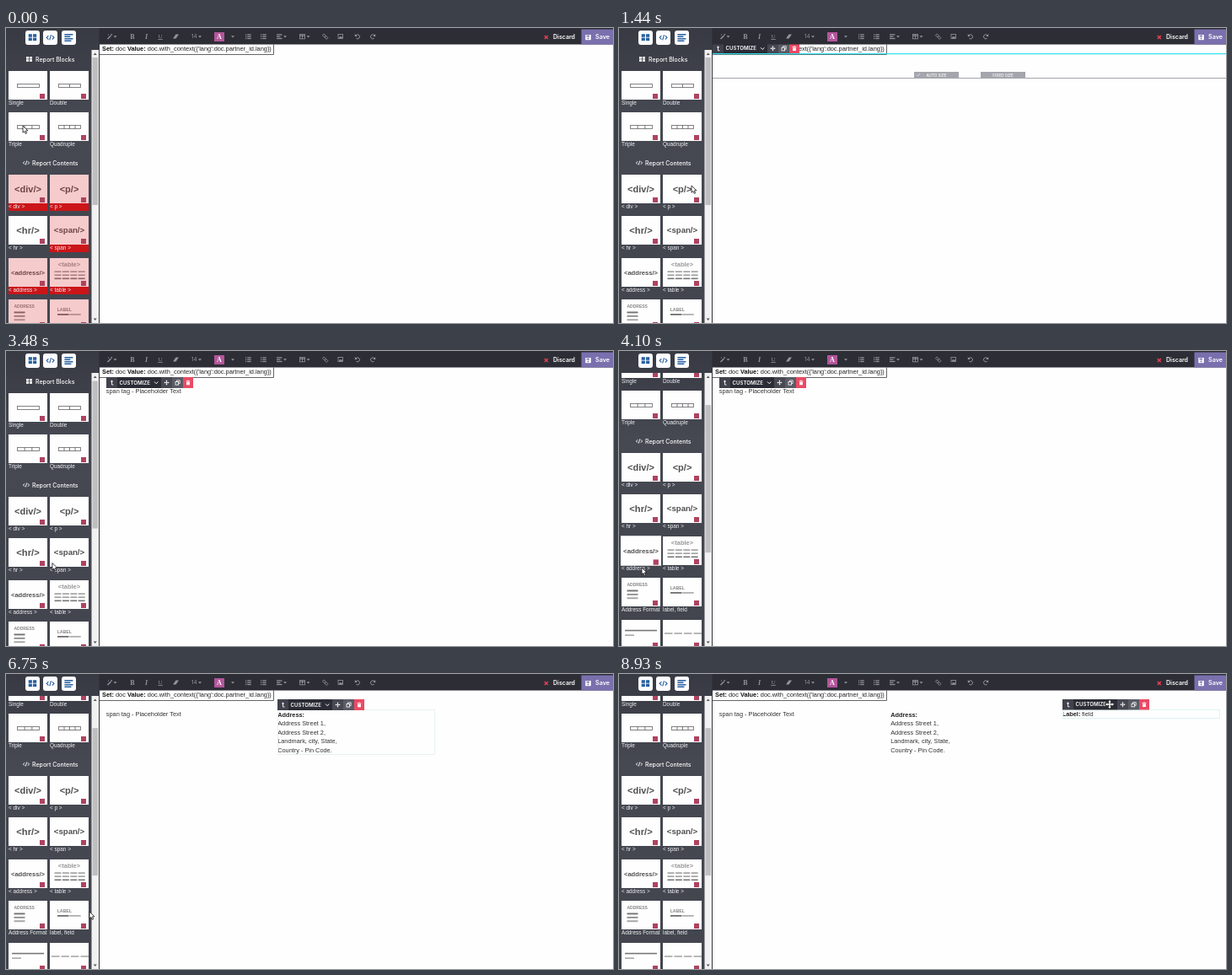
An HTML page with a canvas that plays this animation: 720x350 px, repeating every 8960 ms.

```html
<!DOCTYPE html>
<html lang="en">
<head>
<meta charset="utf-8">
<title>Report editor</title>
<style>
html, body { margin: 0; width: 100%; height: 100%; overflow: hidden; background: #fff; }
canvas { display: block; width: 720px; height: 350px; }
</style>
</head>
<body>
<canvas id="stage" width="720" height="350"></canvas>
<script>
const g = document.getElementById('stage').getContext('2d');
const LOOP = 8960;
const SANS = '"Liberation Sans", Arial, sans-serif';
const UI = 'Inter, sans-serif';
const SERIF = '"Liberation Serif", serif';
const COLS = [119.5, 322.5, 526.5], COL_W = 186;
const SCROLL = 53;

// Pointer path: time, x, y
const PATH = [
  [0, 20, 116], [100, 26, 117], [250, 26, 117], [850, 200, 44], [1000, 200, 44],
  [1440, 86, 187], [1660, 84, 232], [1860, 84, 232], [2510, 198, 45], [2790, 198, 45],
  [3300, 60, 252], [3880, 38, 250], [4100, 27, 257], [4320, 27, 287], [4600, 27, 287],
  [5410, 387, 43], [5600, 387, 43], [6250, 140, 296], [6750, 99, 282], [7000, 82, 287],
  [7240, 82, 287], [8080, 578, 42], [8300, 578, 42], [8800, 582, 36], [8960, 582, 36]
];

// Drags: start, end, tile, grab offset
const DRAGS = [
  [250, 980, 2, 23, 17], [1860, 2790, 7, 32, 10],
  [4580, 5500, 10, 24, 18], [7240, 8220, 11, 30, 18]
];

const clamp = v => Math.max(0, Math.min(1, v));
const ease = v => v * v * (3 - 2 * v);

function pointer(t) {
  let i = 1;
  while (i < PATH.length - 1 && t > PATH[i][0]) i++;
  const [t0, x0, y0] = PATH[i - 1], [t1, x1, y1] = PATH[i];
  const k = ease(clamp((t - t0) / (t1 - t0)));
  return [x0 + (x1 - x0) * k, y0 + (y1 - y0) * k];
}

function box(x, y, w, h, color) {
  g.fillStyle = color;
  g.fillRect(x, y, w, h);
}

function text(s, x, y, size, color, font = SANS, weight = '', align = 'left') {
  g.font = `${weight} ${size}px ${font}`;
  g.fillStyle = color;
  g.textAlign = align;
  g.fillText(s, x, y);
}

function line(points, color, width = 1, dash = []) {
  g.beginPath();
  points.forEach(([x, y], i) => i ? g.lineTo(x, y) : g.moveTo(x, y));
  g.strokeStyle = color;
  g.lineWidth = width;
  g.setLineDash(dash);
  g.stroke();
  g.setLineDash([]);
}

function shape(points, color) {
  g.beginPath();
  points.forEach(([x, y]) => g.lineTo(x, y));
  g.closePath();
  g.fillStyle = color;
  g.fill();
}

function at(x, y, scale, draw) {
  g.save();
  g.translate(x, y);
  g.scale(scale, scale);
  draw();
  g.restore();
}

// Tile art, in a 46 x 34 box
const TILE_H = 34;
const tag = (s, size, color = '#505052', y = 17) => () =>
  text(s, 23, y + size * 0.34, size, color, SANS, 'bold', 'center');

const cells = n => () => {
  g.strokeStyle = '#77777b';
  g.lineWidth = 0.9;
  g.strokeRect(10.5, 15.5, 26, 4);
  for (let i = 1; i < n; i++) {
    const x = 10.5 + 26 * i / n;
    line([[x, 15.5], [x, 19.5]], '#66666a', 0.9);
  }
};

function tableArt() {
  tag('<table>', 7.5, '#98989a', 7)();
  for (let r = 0; r < 3; r++)
    for (let c = 0; c < 4; c++)
      box(5.5 + c * 9.4, 15.3 + r * 4.1, 8, 1.6, r < 2 ? '#a0a0a2' : '#78787a');
}

function addressArt() {
  text('ADDRESS', 6.5, 10.4, 5, '#858587', SANS, 'bold');
  ['#737375', '#8f8f91', '#a5a5a7'].forEach((c, i) => box(6.5, 14.5 + i * 4.4, 13, 1.9, c));
}

function labelArt() {
  text('LABEL', 8.7, 14, 5.2, '#858587', SANS, 'bold');
  box(9, 17, 13.5, 1.8, '#6f6f71');
  box(23.2, 17, 13.5, 1.8, '#b0b0b2');
}

function rulesArt() {
  box(4, 11.8, 38, 1.6, '#777779');
  box(4, 17.4, 11, 1.6, '#aaaaac');
}

function dashesArt() {
  for (let i = 0; i < 4; i++) box(2 + i * 11.5, 15.4, 9.5, 1.3, '#949496');
}

const TILES = [
  ['Single', cells(1)], ['Double', cells(2)], ['Triple', cells(3)], ['Quadruple', cells(4)],
  ['< div >', tag('<div/>', 11)], ['< p >', tag('<p/>', 11)],
  ['< hr >', tag('<hr/>', 11.2)], ['< span >', tag('<span/>', 9.6)],
  ['< address >', tag('<address/>', 7.6)], ['< table >', tableArt],
  ['Address Format', addressArt], ['label, field', labelArt],
  ['Two lines', rulesArt], ['Columns', dashesArt]
];
const ROWS = [51, 100, 174, 223, 273, 322, 372];

function face(i, locked) {
  box(0, 0, 46, TILE_H, '#fefefe');
  TILES[i][1]();
  if (locked) box(0, 0, 46, TILE_H, 'rgba(215,25,30,.22)');
  box(37, 27, 6, 6, '#ae4360');
}

function tile(i, scroll, locked, hot) {
  const x = i % 2 ? 52 : 3, y = ROWS[i >> 1] - scroll;
  const s = hot ? 1.045 : 1;
  at(x - 23 * (s - 1), y - 17 * (s - 1), s, () => face(i, locked));
  if (locked) box(x, y + TILE_H, 46, 9, '#cb1519');
  text(TILES[i][0], x, y + 40.4, 6.4, '#f0f0f2');
}

function ghost(i, x, y) {
  box(x, y, 53, 55.5, '#484a57');
  at(x, y, 1.15, () => face(i, false));
  g.strokeStyle = '#3b3c46';
  g.lineWidth = 1;
  g.strokeRect(x + 0.5, y + 0.5, 52, 55);
  text(TILES[i][0], x + 3.5, y + 50, 6.4, '#fff');
}

function gridIcon(x, y, w, color) {
  const s = w * 0.44;
  for (let i = 0; i < 4; i++)
    box(x + (i % 2) * (w - s), y + (i >> 1) * (w * 0.9 - s), s, s * 0.85, color);
}

function codeIcon(x, y, s, color) {
  at(x, y, s, () => {
    line([[-2, -2], [-4, 0], [-2, 2]], color, 1);
    line([[2, -2], [4, 0], [2, 2]], color, 1);
    line([[0.8, -2.8], [-0.8, 2.8]], color, 1);
  });
}

function sidebar(t) {
  const scroll = Math.round(SCROLL * ease(clamp((t - 3450) / 380)));
  const bg = g.createLinearGradient(0, 0, 0, 350);
  bg.addColorStop(0, '#383a43');
  bg.addColorStop(0.3, '#464952');
  bg.addColorStop(1, '#42454e');
  box(0, 0, 111, 350, bg);

  g.save();
  g.beginPath();
  g.rect(0, 26, 101.5, 324);
  g.clip();
  gridIcon(24, 34 - scroll, 7, '#fff');
  text('Report Blocks', 35, 39.6 - scroll, 7, '#fff', UI, '500');
  codeIcon(24, 160 - scroll, 0.9, '#fff');
  text('Report Contents', 31, 162.6 - scroll, 7, '#fff', UI, '500');
  const hot = t > 3990 && t < 4210 ? 8 : t > 4260 && t < 4580 ? 10 : -1;
  TILES.forEach((_, i) => tile(i, scroll, t < 980 && i > 3 && i !== 6, i === hot));
  g.restore();

  box(101.5, 26, 8.5, 324, '#f1f1f1');
  box(102.5, 35 + scroll * 0.55, 6.5, 175, '#bfbfc1');
  shape([[103.7, 32], [107.7, 32], [105.7, 29.5]], '#555');
  shape([[103.7, 344.5], [107.7, 344.5], [105.7, 347]], '#555');
  box(110, 0, 1, 350, '#33343d');

  [23, 44, 66].forEach(x => {
    g.beginPath();
    g.roundRect(x, 3, 17, 17, 3);
    g.fillStyle = '#fdfdff';
    g.fill();
  });
  const blue = '#28609f';
  gridIcon(26.7, 7.2, 9.5, blue);
  codeIcon(52.6, 11.3, 1.1, blue);
  [10, 7, 10, 8].forEach((w, i) => box(69.4, 7 + i * 2.5, w, 1.5, blue));
}

const caret = (x, c = '#94959c') => shape([[x - 2, 9.2], [x + 2, 9.2], [x, 11.4]], c);

function bars(x, widths, c, dots) {
  widths.forEach((w, i) => {
    const y = 7.3 + i * 2.3;
    if (dots) box(x, y, 1.2, 1.2, c);
    box(x + (dots ? 2.2 : 0), y, w, 1.2, c);
  });
}

function turn(x, dir, c) {
  at(x, 10.3, 1, () => {
    g.scale(dir, 1);
    g.beginPath();
    g.arc(0, 0, 2.5, -2.5, 2.3);
    g.strokeStyle = c;
    g.lineWidth = 1;
    g.stroke();
    shape([[-3.2, -3.2], [-3.2, 0], [-0.4, -0.6]], c);
  });
}

function topbar() {
  const c = '#94959c';
  box(111, 0, 609, 19.5, '#2d2d36');
  line([[120.5, 13], [124.5, 9]], c, 1.4);
  box(124.5, 7, 1.5, 1.5, c);
  box(121, 7.5, 1, 1, c);
  caret(129.5);
  text('B', 150, 12.7, 8, c, SERIF, 'bold', 'center');
  text('I', 166.5, 12.7, 8, c, SERIF, 'italic bold', 'center');
  text('U', 183, 12, 7, c, SERIF, '', 'center');
  box(180.3, 13, 5.5, 0.8, c);
  shape([[198, 12.5], [201.5, 7.5], [205, 7.5], [201.5, 12.5]], c);
  text('14', 220, 12.3, 6.3, c, UI);
  caret(230);
  box(247, 5, 12, 11, '#b3569b');
  text('A', 253, 13.2, 8, '#fff', SERIF, 'bold', 'center');
  caret(269);
  bars(284, [4.5, 4.5, 4.5], c, true);
  bars(302, [4.5, 4.5, 4.5], c, true);
  bars(321, [6.5, 4.5, 6.5], c);
  caret(331);
  g.strokeStyle = c;
  g.lineWidth = 0.8;
  g.strokeRect(348.5, 7.4, 6, 5.4);
  line([[348.5, 9.2], [354.5, 9.2]], c, 1.2);
  line([[351.5, 7.4], [351.5, 12.8]], c, 0.8);
  caret(358.5);
  at(378.7, 10.2, 1, () => {
    g.rotate(Math.PI / 4);
    g.strokeRect(-3.4, -1.2, 3.2, 2.4);
    g.strokeRect(0.2, -1.2, 3.2, 2.4);
  });
  g.strokeRect(394, 7.5, 5.5, 5);
  shape([[394.7, 12], [396.4, 9.7], [397.3, 10.7], [398.2, 9.8], [399, 12]], c);
  turn(417, 1, c);
  turn(435, -1, c);

  line([[638.8, 9], [642.8, 13]], '#e5404f', 1.5);
  line([[642.8, 9], [638.8, 13]], '#e5404f', 1.5);
  text('Discard', 649, 13.2, 7, '#fff', UI, '600');
  box(682.5, 1.5, 37.5, 18, '#7a70ae');
  box(687.3, 8, 6.5, 6.2, '#fff');
  box(688.6, 8.7, 3.4, 1.7, '#7a70ae');
  box(689.7, 11.5, 1.7, 1.7, '#7a70ae');
  text('Save', 699, 13.4, 7.2, '#fff', UI, '600');
}

function cross(x, y, r, color, width) {
  line([[x - r, y], [x + r, y]], color, width);
  line([[x, y - r], [x, y + r]], color, width);
  const a = r * 0.4;
  for (let i = 0; i < 4; i++) {
    g.save();
    g.translate(x, y);
    g.rotate(i * Math.PI / 2);
    shape([[-a, -r + a], [a, -r + a], [0, -r - 0.4]], color);
    g.restore();
  }
}

function tools(x, y, h) {
  const m = y + h / 2;
  box(x, y, 13, h, '#41424c');
  box(x + 13, y, 52, h, '#2b2c35');
  box(x + 65, y, 13, h, '#474852');
  box(x + 78, y, 13, h, '#5a5b65');
  box(x + 91, y, 12, h, '#e94a64');
  line([[x + 8.5, m + 2.5], [x + 6.5, m + 2.5], [x + 6.5, m - 1.5]], '#fff', 0.9);
  shape([[x + 4.8, m - 1], [x + 8.2, m - 1], [x + 6.5, m - 3]], '#fff');
  text('CUSTOMIZE', x + 15.5, m + 2.2, 6.1, '#fff', UI, '600');
  line([[x + 57, m - 1], [x + 59.2, m + 1.2], [x + 61.4, m - 1]], '#fff', 1);
  cross(x + 71.5, m, 2.6, '#fff', 0.8);
  g.strokeStyle = '#fff';
  g.lineWidth = 0.8;
  g.strokeRect(x + 82, m - 1, 3.6, 3.6);
  line([[x + 83.5, m - 1], [x + 83.5, m - 2.6], [x + 87.2, m - 2.6], [x + 87.2, m + 1], [x + 85.6, m + 1]], '#fff', 0.8);
  box(x + 94.6, m - 2, 4.8, 0.9, '#fff');
  box(x + 96.2, m - 2.8, 1.6, 0.9, '#fff');
  box(x + 95.1, m - 0.7, 3.8, 3.5, '#fff');
}

// Drop zones of one column; edges are the dashed rules between them
function zones(x, w, edges, bottom, filled) {
  const dash = '#7d74bd', tint = 'rgba(90,90,170,.12)';
  box(x, 32, w, bottom - 32, tint);
  if (filled) box(x, edges[0], w, edges[1] - edges[0], tint);
  edges.forEach(y => line([[x, y], [x + w, y]], dash, 1, [4, 2.5]));
  [x, x + w].forEach(v => line([[v, 32], [v, bottom]], dash, 1, [4, 2.5]));
}

function sizeTab(x, label, checked) {
  box(x, 52, 53, 7.3, '#a5a5ad');
  text(label, x + 26.5, 57.5, 4.6, '#fff', UI, '500', 'center');
  if (checked) line([[x + 3, 55.6], [x + 4.4, 57], [x + 7, 54]], '#cfe6ff', 0.9);
}

function page(t, drag) {
  const ink = '#333', done = DRAGS.filter(d => t >= d[1]).length;
  box(111, 19, 609, 331, '#fefefe');

  if (done > 1) text('span tag - Placeholder Text', 118.8, 50.4, 7.35, ink);
  if (done > 2) {
    text('Address:', 322.2, 50.8, 7.35, '#222', SANS, 'bold');
    ['Address Street 1,', 'Address Street 2,', 'Landmark, city, State,', 'Country - Pin Code.']
      .forEach((s, i) => text(s, 322.2, 61.3 + i * 10.5, 7.35, ink));
  }
  if (done > 3) {
    text('Label:', 525.7, 50.4, 7.35, '#222', SANS, 'bold');
    text('field', 549, 50.4, 7.35, ink);
  }

  if (drag === 0) zones(111.5, 608, [43.5], 43.5, false);
  if (drag > 0) {
    zones(COLS[0], COL_W, drag > 1 ? [43.5, 53.5] : [43.5], drag > 1 ? 64 : 53, drag > 1);
    zones(COLS[1], COL_W, drag > 2 ? [43.5, 95.5] : [43.5], drag > 2 ? 106 : 53, drag > 2);
    zones(COLS[2], COL_W, [43.5], 53, false);
  }

  box(111, 19.5, 206.5, 12.5, '#fefefe');
  line([[317.5, 19.5], [317.5, 31.5], [111, 31.5]], '#66666b', 1);
  text('Set:', 114, 27.2, 7.35, '#111', SANS, 'bold');
  text('doc', 130, 27.2, 7.35, '#222');
  text('Value:', 144, 27.2, 7.35, '#111', SANS, 'bold');
  text("doc.with_context({'lang':doc.partner_id.lang})", 167.8, 27.2, 7.4, '#222');

  if (drag >= 0) return;
  if (done === 1) {
    box(111, 30, 609, 1.2, '#2fe0ee');
    box(111, 59, 609, 1, '#a5a5ad');
    sizeTab(350, 'AUTO SIZE', true);
    sizeTab(429, 'FIXED SIZE', false);
    tools(111, 18.5, 11.5);
  }
  if (done === 2) tools(119, 31, 13);
  g.lineWidth = 1;
  if (done === 3) {
    g.strokeStyle = '#e8f1f0';
    g.strokeRect(322.5, 42.5, COL_W, 53);
    tools(322, 30, 13);
  }
  if (done === 4) {
    g.strokeStyle = '#dcf4f0';
    g.strokeRect(526.5, 42.5, COL_W, 10);
    tools(526, 30, 12.5);
  }
}

function arrow(x, y) {
  g.beginPath();
  [[0, 0], [0, 8.2], [1.9, 6.5], [3.2, 9.4], [4.6, 8.8], [3.4, 5.9], [6, 5.8]]
    .forEach(([a, b]) => g.lineTo(x + a, y + b));
  g.closePath();
  g.fillStyle = '#fff';
  g.fill();
  g.strokeStyle = '#111';
  g.lineWidth = 0.8;
  g.stroke();
}

function moveCursor(x, y) {
  cross(x, y, 5.4, '#222', 3);
  cross(x, y, 4.4, '#fff', 1.4);
}

function draw(t) {
  const [x, y] = pointer(t);
  const drag = DRAGS.findIndex(d => t >= d[0] && t < d[1]);
  page(t, drag);
  topbar();
  sidebar(t);
  if (drag >= 0) {
    const [, , i, dx, dy] = DRAGS[drag];
    ghost(i, Math.round(x - dx), Math.round(y - dy));
  }
  if (drag >= 0 || t > 8220) moveCursor(x, y);
  else arrow(x, y);
}

const start = performance.now();
function frame() {
  draw((performance.now() - start) % LOOP);
  requestAnimationFrame(frame);
}
frame();
</script>
</body>
</html>
```
